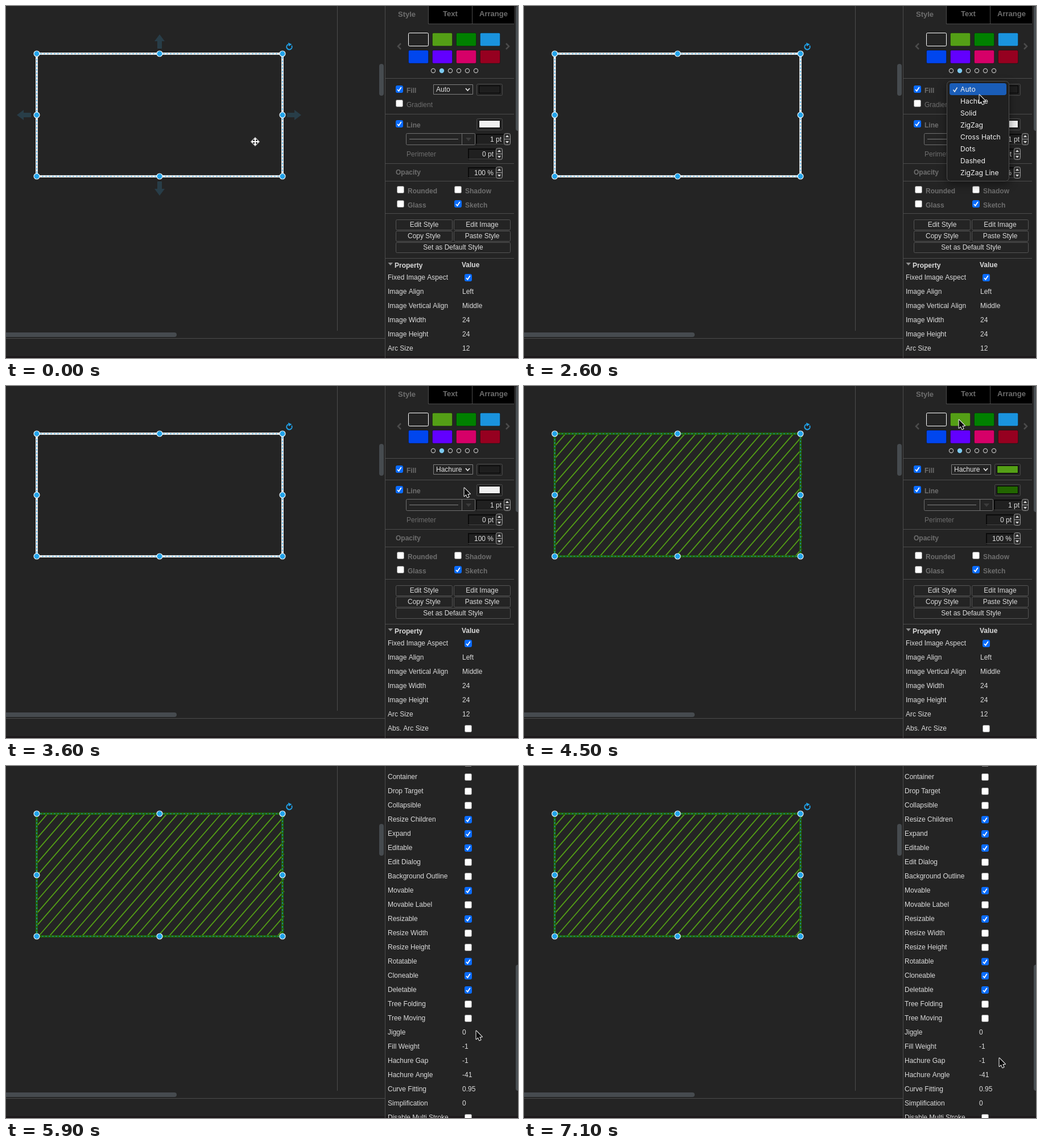
Recreate the animation shown at these times as an HTML page with a canvas. Size 900 px wide and 620 px high, loop 7200 ms.

```html
<!DOCTYPE html>
<html lang="en">
<head>
<meta charset="utf-8">
<title>Sketch fill style</title>
<style>
html, body { margin: 0; width: 100%; height: 100%; overflow: hidden; background: #242424; }
canvas { display: block; }
</style>
</head>
<body>
<canvas id="stage" width="900" height="620"></canvas>
<script>
const ctx = document.getElementById('stage').getContext('2d');
const LOOP = 7200, STEP = 100;
const BG = '#242424', RULE = '#4c4c4c', MUTED = '#6e6e6e', TEXT = '#dcdcdc', BLUE = '#22a3ea';
const GREEN = '#549f16', DARK_GREEN = '#226500';
const SANS = '"Liberation Sans", Arial, sans-serif';
const MENU_OPEN = 2300, MENU_CLOSE = 3300, ROW_REMOVED = 3400, RECOLOR = 4400, NUDGE = 6100;
const SCROLL_END = 959;
const SHAPE = { left: 54, top: 84, right: 486, bottom: 300 };

// time, x, y
const cursorKeys = [
  [0, 438, 239], [200, 474, 249], [800, 816, 331], [1000, 824, 333], [1400, 826, 338],
  [1600, 826, 338], [2200, 800, 152], [2600, 800, 156], [3200, 803, 173], [3600, 805, 179],
  [3900, 805, 179], [4400, 764, 59], [4500, 764, 59], [4800, 825, 466], [5900, 826, 466],
  [6400, 826, 468], [7100, 835, 514]
];
const scrollKeys = [[4700, 0], [5500, SCROLL_END]];

const swatches = [BG, GREEN, '#008000', '#1a93de', '#0046ee', '#6200ff', '#d60068', '#960020'];
const fills = ['Auto', 'Hachure', 'Solid', 'ZigZag', 'Cross Hatch', 'Dots', 'Dashed', 'ZigZag Line'];
// booleans become check boxes
const properties = [
  ['Fixed Image Aspect', true], ['Image Align', 'Left'], ['Image Vertical Align', 'Middle'],
  ['Image Width', '24'], ['Image Height', '24'], ['Arc Size', '12'], ['Abs. Arc Size', false],
  ['Fill Opacity', '100'], ['Stroke Opacity', '100'], ['Overflow', 'Default'], ['Hide Label', false],
  ['Label Padding', '0'], ['Direction', 'East'], ['Constraint', 'None'], ['Rotate Constraint', false],
  ['Connectable', true], ['Allow Arrows', true], ['Snap to Point', false], ['Perimeter', 'None'],
  ['Fixed Dash', false], ['Autosize', false], ['Container', false], ['Drop Target', false],
  ['Collapsible', false], ['Resize Children', true], ['Expand', true], ['Editable', true],
  ['Edit Dialog', false], ['Background Outline', false], ['Movable', true], ['Movable Label', false],
  ['Resizable', true], ['Resize Width', false], ['Resize Height', false], ['Rotatable', true],
  ['Cloneable', true], ['Deletable', true], ['Tree Folding', false], ['Tree Moving', false],
  ['Jiggle', '0'], ['Fill Weight', '-1'], ['Hachure Gap', '-1'], ['Hachure Angle', '-41'],
  ['Curve Fitting', '0.95'], ['Simplification', '0'], ['Disable Multi Stroke', false]
];

function track(keys, t) {
  const next = keys.findIndex(k => k[0] > t);
  if (next === 0) return keys[0].slice(1);
  if (next < 0) return keys[keys.length - 1].slice(1);
  const a = keys[next - 1], b = keys[next];
  const p = (t - a[0]) / (b[0] - a[0]), e = p * p * (3 - 2 * p);
  return a.slice(1).map((v, i) => v + (b[i + 1] - v) * e);
}

function box(x, y, w, h, fill, stroke, radius = 0) {
  ctx.beginPath();
  const o = stroke ? 0.5 : 0;
  ctx.roundRect(x + o, y + o, w - 2 * o, h - 2 * o, radius);
  if (fill) { ctx.fillStyle = fill; ctx.fill(); }
  if (stroke) { ctx.strokeStyle = stroke; ctx.lineWidth = 1; ctx.stroke(); }
}

function text(str, x, y, color = TEXT, font = '12px ' + SANS, align = 'left') {
  ctx.font = font;
  ctx.textAlign = align;
  ctx.fillStyle = color;
  ctx.fillText(str, x, y);
}
const bold = (str, x, y, color = MUTED, size = 12, align) =>
  text(str, x, y, color, `bold ${size}px ${SANS}`, align);

function line(points, color, width = 1) {
  ctx.beginPath();
  for (let i = 0; i < points.length; i += 2) ctx.lineTo(points[i], points[i + 1]);
  ctx.strokeStyle = color;
  ctx.lineWidth = width;
  ctx.stroke();
}

function poly(points, fill, stroke, width = 1) {
  ctx.beginPath();
  for (let i = 0; i < points.length; i += 2) ctx.lineTo(points[i], points[i + 1]);
  ctx.closePath();
  if (stroke) { ctx.strokeStyle = stroke; ctx.lineWidth = width; ctx.stroke(); }
  ctx.fillStyle = fill;
  ctx.fill();
}

function dot(x, y, r, fill, stroke) {
  ctx.beginPath();
  ctx.arc(x, y, r, 0, 7);
  if (fill) { ctx.fillStyle = fill; ctx.fill(); }
  ctx.strokeStyle = stroke;
  ctx.lineWidth = 1.2;
  ctx.stroke();
}

function at(x, y, angle, draw) {
  ctx.save();
  ctx.translate(x, y);
  ctx.rotate(angle);
  draw();
  ctx.restore();
}

function check(x, y, on) {
  box(x, y, 13, 13, on ? '#0a6cff' : '#fff', on ? '#0a6cff' : '#8a8a8a', 2);
  if (on) line([x + 3, y + 7, x + 5.4, y + 9.8, x + 9.8, y + 3], '#fff', 1.8);
}

const rule = y => box(667, y, 226, 1, RULE);

function colorButton(y, color) {
  box(827, y, 46, 21, BG, '#4a4a4a', 2);
  box(831, y + 3, 38, 14, color, '#000');
}

function numberInput(x, y, value) {
  box(x, y, 49, 20, '#202020');
  box(x, y, 49, 2, '#0a0a0a');
  box(x, y, 2, 20, '#0a0a0a');
  box(x, y + 18, 49, 1, '#444');
  text(value, x + 45, y + 14, TEXT, undefined, 'right');
  const s = x + 49;
  box(s, y - 1, 12, 21, '#303030', '#9a9a9a', 3);
  box(s, y + 9, 12, 1, '#9a9a9a');
  poly([s + 3, y + 6, s + 9, y + 6, s + 6, y + 2.5], '#e0e0e0');
  poly([s + 3, y + 13, s + 9, y + 13, s + 6, y + 16.5], '#e0e0e0');
}

function button(str, x, y, w) {
  box(x, y, w, 19, BG, '#555', 2);
  text(str, x + w / 2, y + 13, TEXT, undefined, 'center');
}

function seeded(seed) {
  return () => (seed = (seed * 16807) % 2147483647) / 2147483647 - 0.5;
}

// parallel lines, evenly spaced from the top left corner
function hachure() {
  const rnd = seeded(41), angle = 49 * Math.PI / 180, gap = 14.4;
  const { left, top, right, bottom } = SHAPE;
  const sin = Math.sin(angle), cos = Math.cos(angle);
  for (let d = gap; d < (right - left) * sin + (bottom - top) * cos; d += gap) {
    const xAt = y => left + (d - (y - top) * cos) / sin;
    const x0 = Math.max(xAt(bottom + 1), left + 1) + rnd();
    const x1 = Math.min(xAt(top + 1), right + 2.5) + rnd();
    const yAt = x => top + (d - (x - left) * sin) / cos;
    line([x0, yAt(x0), x1, yAt(x1)], GREEN, 1.8);
  }
}

function shape(green, hovered) {
  const { left, top, right, bottom } = SHAPE;
  const outline = (color, width) => {
    ctx.strokeStyle = color;
    ctx.lineWidth = width;
    ctx.strokeRect(left, top, right - left, bottom - top);
  };
  if (green) hachure();
  outline(green ? DARK_GREEN : '#f0f0f0', 4);
  ctx.setLineDash([3, 3]);
  outline('#1b95dc', 1.2);
  ctx.setLineDash([]);
  for (const x of [left, 270, right])
    for (const y of [top, 192, bottom])
      if (x !== 270 || y !== 192) dot(x, y, 5, BLUE, '#e8f4fb');

  ctx.beginPath();
  ctx.arc(498, 72, 4.7, -0.5, 4.3);
  ctx.strokeStyle = BLUE;
  ctx.lineWidth = 2;
  ctx.stroke();
  poly([496, 64.5, 502.5, 67.5, 497, 71], BLUE);

  if (!hovered) return;
  [[270, 50], [519, 192], [270, 334], [19, 192]].forEach(([x, y], i) =>
    at(x, y, i * Math.PI / 2, () =>
      poly([0, 0, 9, 12, 4, 12, 4, 25, -4, 25, -4, 12, -9, 12], '#283d48')));
}

function editor() {
  box(0, 0, 900, 620, BG);
  box(582, 0, 1, 572, RULE);
  box(0, 585, 666, 1, RULE);
  box(656, 102, 8, 56, '#464b4f', null, 4);
  box(-8, 575, 308, 8, '#464b4f', null, 4);
  box(0, 617, 900, 3, '#1c181a');
}

function fillMenu(pointerY) {
  ctx.save();
  ctx.shadowColor = 'rgba(0,0,0,.45)';
  ctx.shadowBlur = 16;
  ctx.shadowOffsetY = 5;
  box(743, 132, 110, 177, '#202020', null, 6);
  ctx.restore();
  box(743, 132, 110, 177, null, '#505050', 6);
  const active = Math.max(0, Math.floor((pointerY - 136) / 21));
  box(748, 136 + 21 * active, 100, 21, '#1a5db8', null, 4);
  fills.forEach((name, i) => text(name, 767, 151 + 21 * i, '#f0f0f0', '12.2px Inter, sans-serif'));
  line([754.5, 147.5, 757, 151, 761.5, 143.5], '#f0f0f0', 1.5);
}

function panelTop(t, green) {
  box(743, 0, 150, 31, '#000');
  box(742, 0, 1, 32, RULE);
  box(819, 0, 1, 32, RULE);
  box(742, 31, 151, 1, RULE);
  bold('Style', 704.5, 19, MUTED, 13, 'center');
  bold('Text', 781, 18, MUTED, 13, 'center');
  bold('Arrange', 857, 18, MUTED, 13, 'center');

  swatches.forEach((c, i) => {
    const x = 707 + 42 * (i % 4), y = i < 4 ? 47 : 77.5;
    box(x, y, 36, 24, c, i ? 'rgba(0,0,0,.35)' : '#fff', 2);
  });
  line([694, 66, 689, 71, 694, 76], RULE, 2.5);
  line([879, 66, 884, 71, 879, 76], RULE, 2.5);
  for (let i = 0; i < 6; i++) dot(751 + 15 * i, 114, 3.6, i === 1 ? '#7ccaf0' : null, i === 1 ? '#7ccaf0' : '#bdbdbd');
  rule(127);

  check(685, 140, true);
  bold('Fill', 704, 153);
  box(751, 138, 70, 18, BG, '#808080');
  text(t < MENU_CLOSE ? 'Auto' : 'Hachure', 756, 151, '#e4e4e4');
  line([808, 145, 811.5, 149, 815, 145], '#e4e4e4', 1.8);
  colorButton(137, green ? GREEN : '#1e1e1e');
  if (t < ROW_REMOVED) {
    check(685, 165, false);
    text('Gradient', 704, 178, MUTED);
  }
}

function panelRest(green) {
  rule(190);
  check(685, 201, true);
  bold('Line', 704, 214);
  colorButton(198, green ? DARK_GREEN : '#f0f0f0');
  box(703, 224, 122, 21, BG, '#707070', 2);
  box(801, 224, 1, 21, '#707070');
  box(709, 234, 86, 1, '#808080');
  poly([808, 232, 818, 232, 813, 238], '#3c3c3c');
  numberInput(826, 225, '1 pt');
  text('Perimeter', 704, 265, MUTED);
  numberInput(812, 251, '0 pt');
  rule(277);
  bold('Opacity', 685, 297);
  numberInput(812, 284, '100 %');
  rule(308);

  [['Rounded', 687, 317], ['Shadow', 788, 317], ['Glass', 687, 342], ['Sketch', 788, 342]].forEach(([name, x, y]) => {
    check(x, y, name === 'Sketch');
    bold(name, x + 19, y + 13);
  });
  rule(365);
  button('Edit Style', 685, 376, 100);
  button('Edit Image', 787, 376, 100);
  button('Copy Style', 685, 396, 100);
  button('Paste Style', 787, 396, 100);
  button('Set as Default Style', 685, 416, 202);
  rule(444);

  poly([671.5, 452, 680, 452, 675.8, 457], '#909090');
  bold('Property', 683, 461, TEXT);
  bold('Value', 801, 460, TEXT);
  properties.forEach(([name, value], i) => {
    const y = 478 + 25 * i;
    text(name, 671, y + 4);
    if (typeof value === 'boolean') check(806, y - 6, value);
    else text(value, 802, y + 4);
  });
}

function panel(t, green) {
  const [scroll] = track(scrollKeys, t);
  ctx.save();
  ctx.beginPath();
  ctx.rect(667, 0, 233, 620);
  ctx.clip();
  ctx.translate(t < NUDGE ? 0 : -2, -Math.round(scroll));
  panelTop(t, green);
  if (t >= ROW_REMOVED) ctx.translate(0, -25);
  panelRest(green);
  ctx.restore();
  box(666, 0, 1, 620, RULE);
  const top = 350 * scroll / SCROLL_END;
  box(896, top, 8, t < ROW_REMOVED ? 220 : 222, '#4a4f53', null, 4);
}

function pointer(x, y, moving) {
  ctx.lineJoin = 'round';
  if (moving) {
    poly([x, y - 8, x + 8, y, x, y + 8, x - 8, y], '#fff');
    poly([x, y - 7, x + 7, y, x, y + 7, x - 7, y], '#111');
    for (let i = 0; i < 4; i++)
      at(x, y, i * Math.PI / 2, () => poly([0, -7, 3, -3.6, 1, -3.6, 1, 1, -1, 1, -1, -3.6, -3, -3.6], '#fff'));
  } else {
    at(x, y, 0, () =>
      poly([0.5, 0.5, 0.5, 15, 3.8, 11.9, 6, 17.2, 8.5, 16.2, 6.3, 11, 10.8, 11], '#0c0c0c', '#f2f2f2', 2));
  }
  ctx.lineJoin = 'miter';
}

function render(t) {
  const [x, y] = track(cursorKeys, t);
  const green = t >= RECOLOR, overShape = x < SHAPE.right;
  editor();
  shape(green, overShape);
  panel(t, green);
  if (t >= MENU_OPEN && t < MENU_CLOSE) fillMenu(y);
  pointer(Math.round(x), Math.round(y), overShape);
}

function tick() {
  render(Math.floor(performance.now() % LOOP / STEP) * STEP);
  requestAnimationFrame(tick);
}
tick();
</script>
</body>
</html>
```
